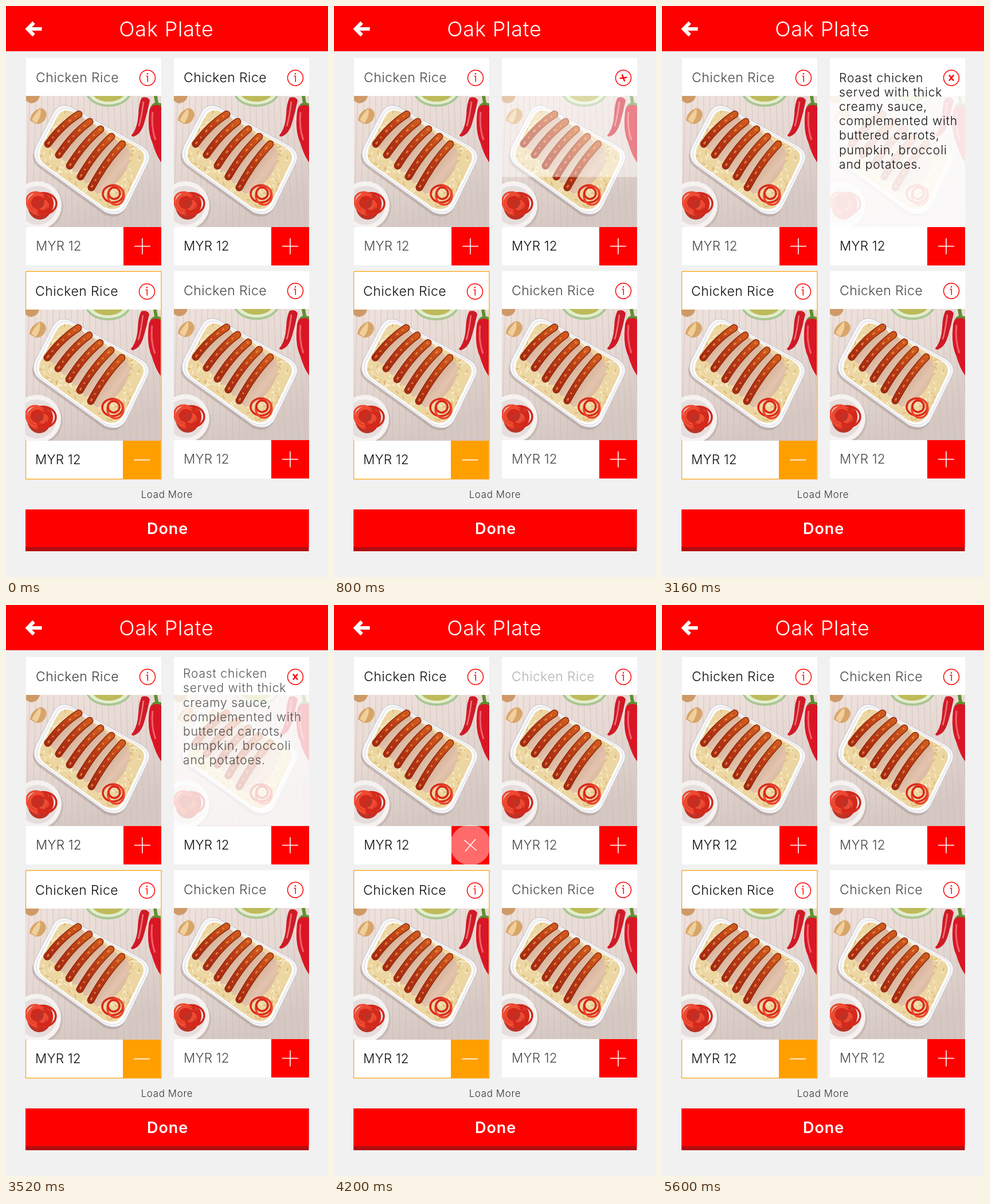
An HTML page for the animation above (6000 ms loop, 562 px wide and 997 px high).

```html
<!DOCTYPE html>
<html lang="en">
<head>
<meta charset="utf-8">
<title>Meal menu</title>
<style>
html, body { margin: 0; width: 100%; height: 100%; overflow: hidden; background: #f1f1f1; }
svg { display: block; width: 100vw; height: 100vh; }
text { font-family: Inter, "Open Sans", sans-serif; font-weight: 300; }
.label { font-size: 23px; letter-spacing: .45px; }
.price { font-size: 22.5px; letter-spacing: .2px; }
.about { font-size: 21px; letter-spacing: .85px; fill: #111; }
.line { fill: none; stroke: #f00; stroke-width: 1.5; }
</style>
</head>
<body>
<svg id="stage" viewBox="0 0 562 997" preserveAspectRatio="none"></svg>
<script>
const LOOP = 6000, STEP = 40;
const clamp = v => Math.max(0, Math.min(1, v));
const span = (t, a, b) => clamp((t - a) / (b - a));
const mix = (a, b, k) => a + (b - a) * k;
const inCubic = u => u ** 3;
const outCubic = u => 1 - (1 - u) ** 3;
const inOutQuad = u => u < .5 ? 2 * u * u : 1 - 2 * (1 - u) ** 2;

let seed = 11;
const rnd = () => (seed = (seed * 16807) % 2147483647) / 2147483647;
const repeat = (n, f) => Array.from({ length: n }, (_, i) => f(i)).join('');

const TRAY = 'M78 19L200 86Q222 99 213 117L176 193Q164 214 138 203L24 121Q8 108 17 88L46 32Q57 10 78 19Z';

// Short grains scattered over the tray
const grains = (n, color) => `<path d="${repeat(n, () => {
  const a = rnd() * Math.PI;
  return `M${(20 + rnd() * 190).toFixed(1)} ${(20 + rnd() * 185).toFixed(1)}` +
    `l${(5 * Math.cos(a)).toFixed(1)} ${(5 * Math.sin(a)).toFixed(1)}`;
})}" fill="none" stroke="${color}" stroke-width="1.8" stroke-linecap="round"/>`;

function slice(k) {
  const tx = 92 + 19 * k, ty = 32 + 13 * k, bx = 38 + 19 * k, by = 84 + 19 * k;
  const mx = (tx + bx) / 2 - 3, my = (ty + by) / 2 - 7;
  const skin = `M${bx} ${by}Q${mx} ${my} ${tx} ${ty}`;
  return `<path d="${skin}q14 6 14 22Q${mx + 36} ${my + 36} ${bx + 11} ${by + 12}Z" fill="url(#meat)"/>
    <path d="${skin}" fill="none" stroke="#8f2a10" stroke-width="13" stroke-linecap="round"/>
    <path d="${skin}" fill="none" stroke="url(#skin)" stroke-width="10" stroke-linecap="round"/>
    <path d="${skin}" fill="none" stroke="#eb9648" stroke-width="3" stroke-dasharray="5 8 3 11" opacity=".75"/>`;
}

const rings = (x, y, r, n) => repeat(n, i =>
  `<ellipse cx="${x + 5 * Math.cos(i * 2.4)}" cy="${y + 5 * Math.sin(i * 2.4)}" rx="${r - i * 2}" ry="${r * .8 - i}"
    transform="rotate(${i * 47} ${x} ${y})" fill="none" stroke="${i % 2 ? '#ef4a32' : '#d2291c'}" stroke-width="3.5"/>`);

const photo = `<g id="photo" clip-path="url(#frame)">
  <rect width="236" height="229" fill="url(#wood)"/>
  <path d="${repeat(24, i => `M${i * 10.5 - 4} 0L${i * 11.5 - 12} 229`)}" stroke="#c9b7b1" stroke-width="1.6" opacity=".4"/>
  <path d="M0 0H24Q22 11 10 13Q3 12 0 8Z" fill="#cf9a68"/>
  <path d="M7 43Q8 28 25 21Q36 23 36 34Q31 50 18 49Z" fill="#d8a569"/>
  <path d="M10 42Q16 30 25 22Q28 34 18 48Z" fill="#f0cf9b"/>
  <ellipse cx="144" cy="-8" rx="40" ry="27" fill="#a9c693"/>
  <ellipse cx="144" cy="-10" rx="37" ry="25" fill="#e3edce"/>
  <ellipse cx="144" cy="-10" rx="30" ry="20" fill="#bdbb5a"/>
  <path d="M202 3Q213 0 216 8Q212 28 206 48Q200 68 187 71Q181 70 187 65Q195 52 196 32Q197 12 202 3Z" fill="#cf1a27"/>
  <path d="M205 10Q202 35 197 53" stroke="#f0747a" stroke-width="2.5" fill="none"/>
  <path d="M236 14Q217 10 215 28Q211 62 221 83Q227 104 236 116Z" fill="#d81626"/>
  <path d="M221 28Q218 54 226 77" stroke="#f2606a" stroke-width="3" fill="none"/>
  <path d="M223 0H229L231 12L236 13V18Q226 13 218 19Q220 13 225 12Z" fill="#5f9132"/>
  <circle cx="23" cy="194" r="42" fill="#b9a9a4" opacity=".5"/>
  <circle cx="20" cy="191" r="42" fill="#f5f2f1"/>
  <circle cx="20" cy="191" r="34" fill="#e5dedd"/>
  <ellipse cx="24" cy="192" rx="21" ry="24" fill="#bd3226"/>
  ${rings(25, 188, 23, 7)}
  <path d="${TRAY}" fill="#8f7d78" opacity=".35" transform="translate(-2 4)"/>
  <path d="${TRAY}" fill="#f6f6f8" stroke="#c4c2c8"/>
  <path d="${TRAY}" fill="#fff" stroke="#d4d2d6" transform="translate(6 6) scale(.95)"/>
  <g clip-path="url(#bed)">
    <rect width="236" height="229" fill="#ecd6a2"/>
    ${grains(190, '#d8b775')}${grains(260, '#f9edcd')}
  </g>
  ${repeat(5, slice)}
  <g fill="none" stroke-width="3.5">
    <ellipse cx="152" cy="171" rx="18" ry="15" stroke="#d92a18"/>
    <ellipse cx="157" cy="174" rx="14" ry="16" stroke="#ee452d"/>
    <ellipse cx="154" cy="170" rx="10" ry="10" stroke="#d92a18"/>
  </g>
</g>`;

const defs = `<defs>
  <clipPath id="frame"><rect width="236" height="229"/></clipPath>
  <clipPath id="bed"><path d="${TRAY}" transform="translate(11 10.5) scale(.905)"/></clipPath>
  <clipPath id="bounds"><rect x="-1" width="238" height="363"/></clipPath>
  <linearGradient id="wood" x2=".4" y2="1">
    <stop stop-color="#efe2dd"/><stop offset=".5" stop-color="#e6d9d4"/><stop offset="1" stop-color="#d5c8c3"/>
  </linearGradient>
  <linearGradient id="skin" x1="1" x2="0" y2="1">
    <stop stop-color="#cf5a1c"/><stop offset=".5" stop-color="#b83a14"/><stop offset="1" stop-color="#a92a12"/>
  </linearGradient>
  <linearGradient id="meat" x2="1" y2="1">
    <stop stop-color="#b98a6b"/><stop offset=".6" stop-color="#e3c4ae"/><stop offset="1" stop-color="#c79c80"/>
  </linearGradient>
  ${photo}
</defs>`;

const ABOUT = ['Roast chicken', 'served with thick', 'creamy sauce,', 'complemented with',
  'buttered carrots,', 'pumpkin, broccoli', 'and potatoes.'];

const card = (id, x, y) => `<g id="${id}" transform="translate(${x} ${y})">
  <rect width="236" height="362" fill="#fff"/>
  <rect data-p="border" x="-.5" y=".5" width="236.5" height="362.5" fill="#fff" stroke="#ff9f00" stroke-width="1.2"/>
  <g data-p="body">
    <text data-p="title" class="label" x="17" y="42">Chicken Rice</text>
    <use href="#photo" y="66"/>
    <text data-p="price" class="price" x="17" y="336">MYR 12</text>
    <rect data-p="button" x="170" y="295" width="66" height="67"/>
    <rect data-p="veil" width="236" height="0" fill="#fff"/>
    <g data-p="about" class="about" opacity="0">
      ${ABOUT.map((s, i) => `<text x="16" y="${41.5 + i * 25.2}">${s}</text>`).join('')}
    </g>
    <circle cx="212" cy="34.5" r="13.5" class="line"/>
    <g data-p="info" class="line">
      <path d="M209.5 31.5H212.3V41.5"/><circle cx="212" cy="27.5" r="1.2" fill="#f00" stroke="none"/>
    </g>
    <path data-p="close" class="line" style="stroke-width:2.4" d="M208 29.5l8 10m0-10l-8 10"/>
    <g data-p="sign" stroke="#fff" stroke-width="1.6">
      <path d="M-14 0H14"/><path data-p="bar" d="M0-14V14"/>
    </g>
  </g>
  <g clip-path="url(#bounds)"><circle data-p="splash" cx="203" cy="328" fill="#fff"/></g>
  <circle data-p="tap" cx="212" cy="34.5" fill="#fff"/>
</g>`;

const stage = document.getElementById('stage');
stage.innerHTML = `${defs}
  <rect width="562" height="997" fill="#f1f1f1"/>
  <rect width="562" height="79" fill="#f00"/>
  <path d="M48.5 29L37.8 40L48.5 51M39 40H62.5" fill="none" stroke="#fff" stroke-width="6.2"/>
  <text x="280" y="53" font-size="36" letter-spacing=".8" text-anchor="middle" fill="#fff">Oak Plate</text>
  ${card('a', 35, 91)}${card('b', 293, 91)}${card('c', 35, 463)}${card('d', 293, 463)}
  <text x="281" y="858.5" font-size="17" letter-spacing=".6" text-anchor="middle" fill="#333">Load More</text>
  <rect x="34" y="879" width="494.5" height="73" fill="#b20d10"/>
  <rect x="34" y="879" width="494.5" height="66" fill="#f00"/>
  <text x="282" y="921.5" font-size="27" letter-spacing=".9" text-anchor="middle" fill="#fff" style="font-weight:600">Done</text>`;

const parts = {};
for (const id of 'abcd') {
  parts[id] = {};
  for (const el of document.querySelectorAll(`#${id} [data-p]`)) parts[id][el.dataset.p] = el;
}
const set = (el, attrs) => { for (const k in attrs) el.setAttribute(k, attrs[k]); };

function drawCard(id, s) {
  const p = parts[id];
  const { hover = 0, picked = 0, amber = picked, turn = 0, splash = 0, tap = 0,
    title = 1, veil = 0, height = 0, about = 0, lift = 0, cross = 0, spin = 0 } = s;
  const ink = Math.round(mix(72, 14, hover));
  const fill = `rgb(${ink},${ink},${ink})`;
  set(p.border, { opacity: picked });
  set(p.body, { transform: `translate(${-picked} ${picked})` });
  set(p.title, { fill, opacity: title });
  set(p.price, { fill });
  set(p.button, { fill: `rgb(255,${Math.round(159 * amber)},0)` });
  set(p.sign, { transform: `translate(203 328.5) rotate(${turn})` });
  set(p.bar, { transform: `scale(1 ${1 - amber})`, opacity: amber < 1 ? 1 : 0 });
  set(p.veil, { height: 295 * height, opacity: veil });
  set(p.about, { opacity: about, transform: `translate(0 ${lift})` });
  set(p.info, { opacity: 1 - cross });
  set(p.close, { opacity: cross, transform: `rotate(${spin} 212 34.5)` });
  set(p.splash, { r: 100 * splash ** 1.5, opacity: .42 * Math.min(1, 2 - 2 * splash) });
  set(p.tap, { r: 34 * outCubic(tap), opacity: .42 * (1 - tap) });
}

// Description panel: slides down, later back up
function panel(t) {
  if (t < 3160) {
    const u = span(t, 620, 1160), e = outCubic(u), show = span(t, 880, 1160);
    return {
      hover: 1, tap: span(t, 320, 620), title: 1 - span(t, 560, 760),
      height: e, veil: .88 * (1 - (1 - u) ** 1.8),
      about: show, lift: -26 * (1 - show), cross: span(u, .1, .28), spin: -200 * (1 - e)
    };
  }
  const u = span(t, 3460, 4000), e = inCubic(u);
  return {
    hover: 1 - span(t, 3520, 3720), tap: span(t, 3160, 3460), title: span(t, 4000, 4480),
    height: 1 - e, veil: .88 * (1 - u),
    about: (1 - u) ** 3, lift: -48 * u, cross: 1 - span(u, .65, .9), spin: 200 * e
  };
}

function pick(t) {
  const hover = span(t, 3480, 3700);
  if (t < 4800) return {
    hover, picked: span(t, 4420, 4600), amber: span(t, 4280, 4600),
    turn: 180 * inOutQuad(span(t, 4000, 4600)), splash: span(t, 4000, 4400)
  };
  return {
    hover, picked: 1 - span(t, 5280, 5600), amber: 1 - span(t, 5080, 5600),
    turn: 180 * (1 - inOutQuad(span(t, 4840, 5600))), splash: span(t, 4800, 5200)
  };
}

function render(t) {
  drawCard('a', pick(t));
  drawCard('b', panel(t));
}

drawCard('c', { hover: 1, picked: 1 });
drawCard('d', {});

function tick() {
  render(Math.floor(performance.now() % LOOP / STEP) * STEP);
  requestAnimationFrame(tick);
}
tick();
</script>
</body>
</html>
```
